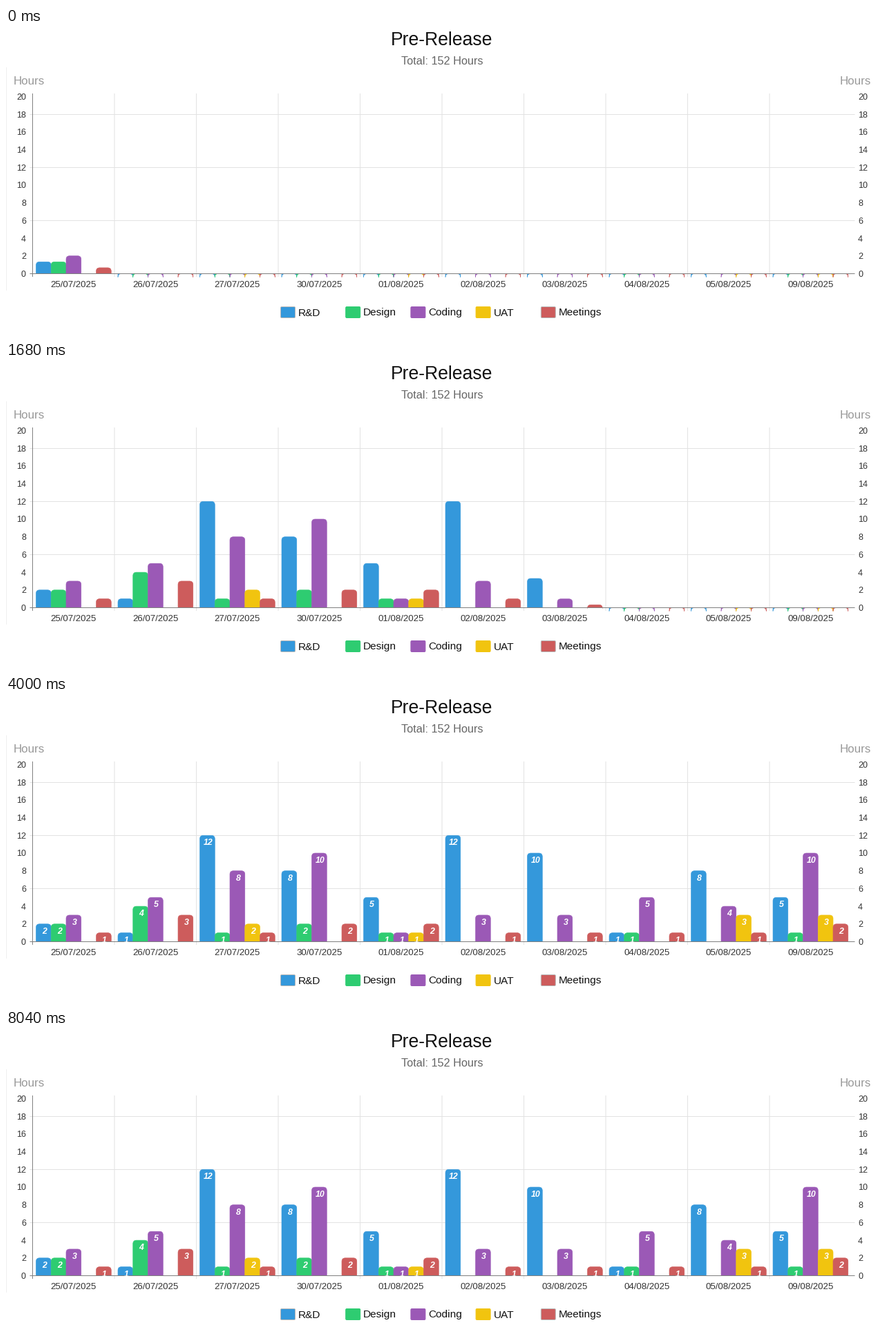
These frames come from a looping animation (1262x444 px, 8.12 s). A matplotlib script:

```python
import numpy as np
import matplotlib.pyplot as plt
from matplotlib.animation import FuncAnimation
from matplotlib.patches import FancyBboxPatch, PathPatch, Rectangle
from matplotlib.path import Path

WIDTH, HEIGHT, DPI = 1262, 444, 64
LOOP_MS, STEP_MS = 8120, 40

LEFT, PITCH, BASE, UNIT = 38.5, 118.5, 356.5, 12.85
BAR_WIDTH, BAR_PAD, RADIUS = 21.75, 5, 5
LABEL_START, LABEL_FADE = 2840, 240

SERIES = {
    "R&D": "#3498db",
    "Design": "#2ecc71",
    "Coding": "#9b59b6",
    "UAT": "#f1c40f",
    "Meetings": "#cd5c5c",
}
HOURS = {
    "25/07/2025": (2, 2, 3, 0, 1),
    "26/07/2025": (1, 4, 5, 0, 3),
    "27/07/2025": (12, 1, 8, 2, 1),
    "30/07/2025": (8, 2, 10, 0, 2),
    "01/08/2025": (5, 1, 1, 1, 2),
    "02/08/2025": (12, 0, 3, 0, 1),
    "03/08/2025": (10, 0, 3, 0, 1),
    "04/08/2025": (1, 1, 5, 0, 1),
    "05/08/2025": (8, 0, 4, 3, 1),
    "09/08/2025": (5, 1, 10, 3, 2),
}

plt.rcParams["font.family"] = "Liberation Sans"
fig = plt.figure(figsize=(WIDTH / DPI, HEIGHT / DPI), dpi=DPI, facecolor="white")
ax = fig.add_axes([0, 0, 1, 1])
ax.set_xlim(0, WIDTH)
ax.set_ylim(HEIGHT, 0)
ax.axis("off")


def px(size):
    return size * 72 / DPI


def text(x, y, label, size, color, ha="center", **style):
    return ax.text(x, y, label, fontsize=px(size), color=color, ha=ha,
                   va="baseline", **style)


def line(x0, y0, x1, y1, color, z=1):
    ax.plot([x0, x1], [y0, y1], color=color, lw=px(1), zorder=z,
            solid_capstyle="butt", snap=False)


def bar_path(x, height):
    """Bar with rounded top; at zero height the corners hang below the axis."""
    top, right = BASE - height, x + BAR_WIDTH
    points = [(x, BASE), (x, top + RADIUS), (x, top), (x + RADIUS, top),
              (right - RADIUS, top), (right, top), (right, top + RADIUS),
              (right, BASE), (x, BASE)]
    codes = [Path.MOVETO, Path.LINETO, Path.CURVE3, Path.CURVE3,
             Path.LINETO, Path.CURVE3, Path.CURVE3, Path.LINETO,
             Path.CLOSEPOLY]
    return Path(points, codes)


def draw_axes():
    right = LEFT + PITCH * len(HOURS)
    line(0.5, 57, 0.5, 381, "#efefef")
    for value in (6, 12, 18):
        y = round(BASE - value * UNIT - 0.5) + 0.5
        line(LEFT - 4, y, right + 5, y, "#e2e2e2")
    for i in range(1, len(HOURS)):
        x = LEFT + PITCH * i
        line(x, 95, x, 361, "#e2e2e2")
    line(LEFT, 95, LEFT, 361, "#808080", 4)
    line(LEFT - 4, BASE, right + 5, BASE, "#808080", 4)
    for value in range(0, 21, 2):
        y = BASE - value * UNIT + 4.5
        text(29, y, str(value), 12.5, "#333333", "right")
        text(1233, y, str(value), 12.5, "#333333", "left")
    for i, date in enumerate(HOURS):
        text(LEFT + PITCH * (i + 0.5), 376, date, 13.2, "#333333")


def draw_headings():
    text(631, 25, "Pre-Release", 26.6, "#111111")
    text(631, 53, "Total: 152 Hours", 16.2, "#666666")
    text(11, 82, "Hours", 16.9, "#999999", "left")
    text(1252, 82, "Hours", 16.9, "#999999", "right")


def draw_legend():
    for i, (name, color) in enumerate(SERIES.items()):
        x = 397 + 94.2 * i
        edge = "#b8b8b8" if name in ("R&D", "Meetings") else color
        ax.add_patch(FancyBboxPatch(
            (x + 0.5, 404.5), 21, 16, boxstyle="round,pad=0,rounding_size=1.5",
            facecolor=color, edgecolor=edge, lw=px(1)))
        text(x + 26, 417.5, name, 15.4, "#111111", "left")


def make_bars():
    clip = Rectangle((0, 0), WIDTH, 358, transform=ax.transData)
    bars, labels = [], []
    for i, values in enumerate(HOURS.values()):
        for j, (value, color) in enumerate(zip(values, SERIES.values())):
            if not value:
                continue
            x = LEFT + PITCH * i + BAR_PAD + BAR_WIDTH * j
            bar = PathPatch(bar_path(x, 0), facecolor=color, edgecolor=color,
                            lw=px(0.6), joinstyle="round", zorder=3)
            ax.add_patch(bar)
            bars.append((bar, i, x, value))
            label = text(x + BAR_WIDTH / 2 + 1, BASE - value * UNIT + 14,
                         str(value), 12.2, "white", style="italic",
                         weight="bold", zorder=5)
            label.set_clip_path(clip)
            labels.append(label)
    return bars, labels


draw_axes()
draw_headings()
draw_legend()
bars, labels = make_bars()


def days_shown(t):
    """Days grow one after another, about 300 ms each."""
    return np.interp(t, [0, 640, 1680, 2360, 2840], [0.67, 2.81, 6.33, 8.45, 10])


def update(frame):
    t = frame * STEP_MS
    shown = days_shown(t)
    for bar, day, x, value in bars:
        growth = np.clip(shown - day, 0, 1)
        bar.set_path(bar_path(x, value * UNIT * growth))
    alpha = float(np.clip((t - LABEL_START) / LABEL_FADE, 0, 1))
    for label in labels:
        label.set_visible(alpha > 0)
        label.set_alpha(alpha)
    return [bar[0] for bar in bars] + labels


anim = FuncAnimation(fig, update, frames=LOOP_MS // STEP_MS, interval=STEP_MS,
                     init_func=lambda: update(0), repeat=True, repeat_delay=0)
plt.show()
```
